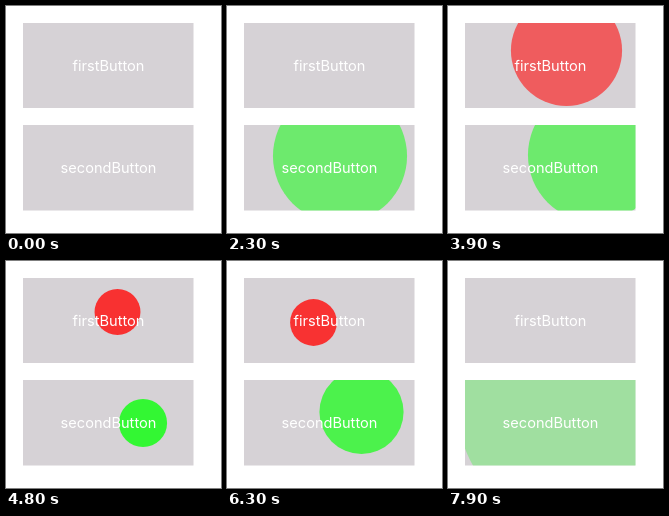
Animation of 215x227 px, one loop 8 s. Source, as an HTML page:

```html
<!DOCTYPE html>
<html lang="en">
<head>
<meta charset="utf-8">
<title>Ripple buttons</title>
<style>
  html, body { margin: 0; width: 100%; height: 100%; overflow: hidden; background: #fff; }
  svg { display: block; width: 215px; height: 227px; }
  text { font: 400 14.6px Inter, Roboto, sans-serif; fill: #fff; text-anchor: middle; }
</style>
</head>
<body>
<svg viewBox="0 0 215 227">
  <defs>
    <clipPath id="top"><rect x="17" y="17" width="170.5" height="85"/></clipPath>
    <clipPath id="bottom"><rect x="17" y="119" width="170.5" height="85.5"/></clipPath>
  </defs>
  <rect x="17" y="17" width="170.5" height="85" fill="#d6d2d6"/>
  <rect x="17" y="119" width="170.5" height="85.5" fill="#d6d2d6"/>
  <g clip-path="url(#top)"><circle id="red" fill="#ff1414"/></g>
  <g clip-path="url(#bottom)"><circle id="green" fill="#14ff14"/></g>
  <text x="102.5" y="65">firstButton</text>
  <text x="102.5" y="167">secondButton</text>
</svg>
<script>
const LOOP = 8000, STEP = 100, LIFE = 500;
const SPEED = 0.225;  // px per ms
const FADE = 145;     // radius at which a ripple is fully clear

// Taps: [start ms, x, y]
const taps = {
  red: [
    [20, 78, 60], [440, 78, 52], [873, 111.5, 43], [1400, 130, 50],
    [3050, 132, 52], [3653, 118.5, 44.5], [4180, 112, 50], [4698, 111.5, 51],
    [5220, 100, 56], [5700, 92, 60], [6196, 86.5, 61.5], [6700, 95, 58], [7200, 104, 54]
  ],
  green: [
    [2002, 113, 150], [2520, 132, 152], [3080, 142, 150], [3602, 147, 149],
    [4160, 142, 156], [4693, 137, 162], [5200, 136, 158], [5660, 135, 154],
    [6113, 134.5, 151], [6650, 126, 152], [7433, 116, 152]
  ]
};

function drawRipple(id, t) {
  const tap = taps[id].filter(([start]) => t > start && t < start + LIFE).pop();
  const circle = document.getElementById(id);
  if (!tap) return circle.setAttribute("r", 0);
  const [start, x, y] = tap;
  const r = (t - start) * SPEED;
  circle.setAttribute("cx", x);
  circle.setAttribute("cy", y);
  circle.setAttribute("r", r);
  circle.setAttribute("opacity", 1 - r / FADE);
}

let origin;
function tick(now) {
  origin ??= now;
  const t = Math.floor(((now - origin) % LOOP) / STEP) * STEP;
  drawRipple("red", t);
  drawRipple("green", t);
  requestAnimationFrame(tick);
}
requestAnimationFrame(tick);
</script>
</body>
</html>
```
